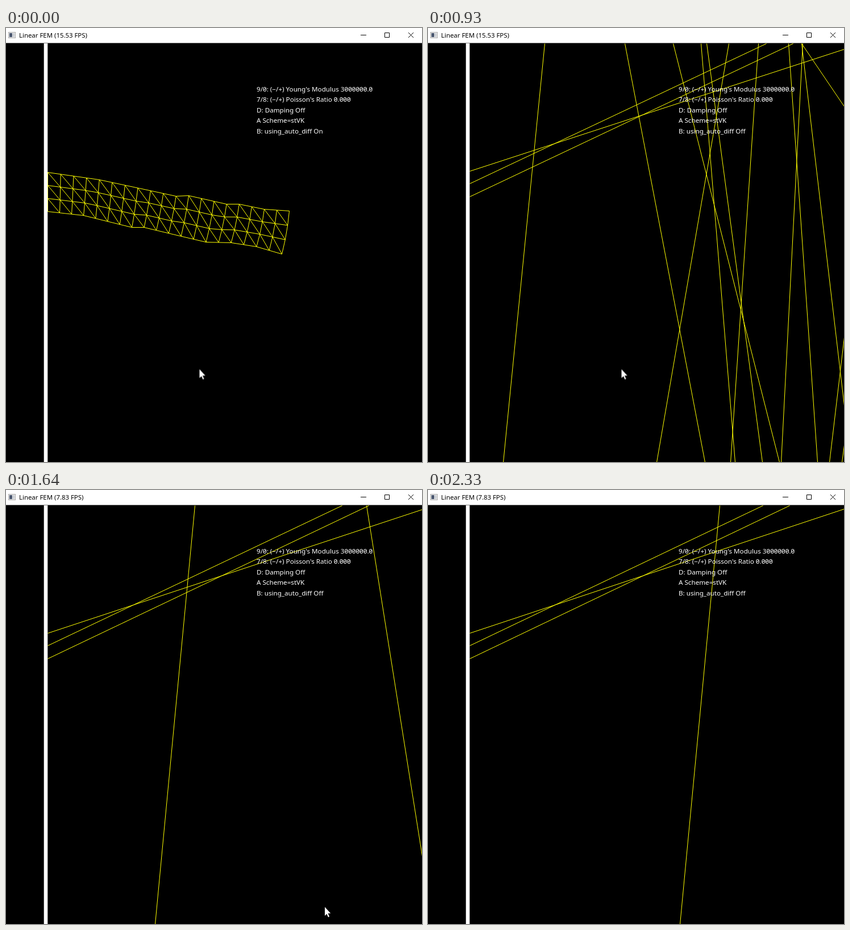
An HTML page that plays this animation: 732 px wide and 765 px high, repeating every 2810 ms.

```html
<!DOCTYPE html>
<html lang="en">
<head>
<meta charset="utf-8">
<title>Linear FEM</title>
<style>
html, body { margin: 0; width: 100%; height: 100%; overflow: hidden; background: #000; }
svg { display: block; width: 100%; height: 100%; }
text { font-family: "Noto Sans", sans-serif; white-space: pre; }
.title { font-size: 11.4px; fill: #000; }
.info { font-size: 11.65px; font-weight: 500; fill: #fff; font-variant-numeric: slashed-zero; }
.wire { fill: none; stroke: #ff0; stroke-width: 1; }
.show { visibility: hidden; animation: 2810ms step-end infinite; }
.cursor { animation: cursor 2810ms step-end infinite; }
#beam, .on { animation-name: first; }
#burst { animation-name: second; }
#spread { animation-name: third; }
#settle0 { animation-name: fourth; }
#settle1 { animation-name: fifth; }
#settle2 { animation-name: sixth; }
.off { animation-name: after-first; }
.fast { animation-name: fast; }
.slow { animation-name: slow; }
@keyframes first { 0% { visibility: visible } 11.387%, 100% { visibility: hidden } }
@keyframes after-first { 0% { visibility: hidden } 11.387%, 100% { visibility: visible } }
@keyframes second { 0% { visibility: hidden } 11.387% { visibility: visible } 33.096%, 100% { visibility: hidden } }
@keyframes third { 0% { visibility: hidden } 33.096% { visibility: visible } 58.362%, 100% { visibility: hidden } }
@keyframes fourth { 0% { visibility: hidden } 58.362% { visibility: visible } 80.427%, 100% { visibility: hidden } }
@keyframes fifth { 0% { visibility: hidden } 80.427% { visibility: visible } 82.918%, 100% { visibility: hidden } }
@keyframes sixth { 0% { visibility: hidden } 82.918%, 100% { visibility: visible } }
@keyframes fast { 0% { visibility: visible } 58.362%, 100% { visibility: hidden } }
@keyframes slow { 0% { visibility: hidden } 58.362%, 100% { visibility: visible } }
@keyframes cursor {
  0% { transform: translate(340.5px, 601.5px) }
  55.516% { transform: translate(342.5px, 602.5px) }
  58.362% { transform: translate(561px, 735px) }
  60.854% { transform: translate(718px, 758px) }
  75.088%, 100% { transform: translate(760px, 800px) }
}
</style>
</head>
<body>
<svg viewBox="0 0 732 765">
  <defs><clipPath id="stage"><rect x="73" y="27" width="659" height="738"/></clipPath></defs>
  <rect width="732" height="765"/>
  <g clip-path="url(#stage)">
    <g class="wire" transform="translate(.5 .5)">
      <path id="beam" class="show"/>
      <path id="burst" class="show"/>
      <path id="spread" class="show"/>
      <path id="settle0" class="show"/>
      <path id="settle1" class="show"/>
      <path id="settle2" class="show"/>
    </g>
  </g>
  <rect x="66.7" y="27" width="6.6" height="738" fill="#fff"/>
  <g class="info">
    <text x="441" y="111.5">9/0: (−/+) Young's Modulus 3000000.0</text>
    <text x="441" y="130">7/8: (−/+) Poisson's Ratio 0.000</text>
    <text x="441" y="148.5">D: Damping Off</text>
    <text x="441" y="167">A Scheme=stVK</text>
    <text x="441" y="185.5" class="show on">B: using_auto_diff On</text>
    <text x="441" y="185.5" class="show off">B: using_auto_diff Off</text>
  </g>
  <rect width="732" height="26.5" fill="#fff"/>
  <rect x="4.5" y="7.5" width="12" height="10" fill="#eee" stroke="#aaa"/>
  <rect x="6" y="9" width="5" height="7" fill="#4b5870"/>
  <rect x="12" y="9" width="3" height="7" fill="#c8ccd2"/>
  <text x="23" y="17" class="title show fast">Linear FEM (15.53 FPS)</text>
  <text x="23" y="17" class="title show slow">Linear FEM (7.83 FPS)</text>
  <path d="M624 12.5h10M666.5 8.5h8v8h-8zM708 8l9 9m0-9l-9 9" fill="none" stroke="#000"/>
  <path class="cursor" d="M0 0V15.5L3.4 12.2 6 18 8 17.1 5.5 11.3H10.2Z" fill="#fff"/>
</svg>
<script>
const TOP = 27, BOTTOM = 765, WALL = 73, RIGHT = 732;

const line = (x1, y1, x2, y2) => `M${x1} ${y1}L${x2} ${y2}`;
const fan = (x, y, ...ends) => ends.map(([a, b]) => line(x, y, a, b)).join("");
const span = (topX, bottomX) => line(topX, TOP, bottomX, BOTTOM);
const repeat = (count, make) => Array.from({ length: count }, (_, i) => make(i)).join("");
const draw = (id, ...parts) => document.getElementById(id).setAttribute("d", parts.join(""));
const mix = (a, b, t) => a + (b - a) * t;

// Three edges that stay pinned to the wall.
const anchors = (edgeY, upperX, lowerX) =>
  line(WALL, 252, RIGHT, edgeY) + line(WALL, 274, upperX, TOP) + line(WALL, 297, lowerX, TOP);

let seed = 11;
const random = () => (seed = seed * 16807 % 2147483647) / 2147483647;

// Steep lines in even steps with some jitter, crossing near one waist.
const bundle = (count, left, right, waistX, waistY) => repeat(count, i => {
  const topX = mix(left, right, (i + random()) / count);
  const midX = waistX + (random() - .5) * (right - left) * .5;
  return span(topX, topX + (midX - topX) * (BOTTOM - TOP) / (waistY - TOP));
});

// Height along a polyline of [column, y] points.
function along(points, c) {
  const i = Math.max(1, points.findIndex(p => p[0] >= c));
  const [c0, y0] = points[i - 1], [c1, y1] = points[i];
  return mix(y0, y1, (c - c0) / (c1 - c0));
}

function beam(columns = 19, rows = 3) {
  const upper = [[0, 254], [4, 267], [10, 296], [11, 295], [14, 310], [15, 310], [17, 319], [19, 322]];
  const lower = [[0, 323], [3, 330], [7, 351], [8, 351], [13, 377], [15, 378], [17, 385], [19, 398]];
  const node = (r, c) => {
    const s = c / columns, t = r / rows;
    const bow = mix(2, -4, t) * Math.sin(Math.PI * s);
    return [mix(WALL, mix(498, 485, t * (t + 1) / 2), s) + bow, mix(along(upper, c), along(lower, c), t)];
  };
  return repeat(rows + 1, r => repeat(columns + 1, c => {
    const ends = [];
    if (c < columns) ends.push(node(r, c + 1));
    if (r < rows) ends.push(node(r + 1, c));
    if (c < columns && r < rows) ends.push(node(r + 1, c + 1));
    return fan(...node(r, c), ...ends);
  }));
}

draw("beam", beam());

draw("burst",
  anchors(48, 613, 657),
  bundle(13, 185, 335, 285, 290),
  bundle(9, 410, 690, 520, 420),
  fan(WALL, 240, [550, TOP], [707, TOP]),
  fan(WALL, 541, [718, TOP], [RIGHT, 195], [WALL, 515]),
  fan(WALL, 70, [103, TOP], [127, TOP]),
  fan(WALL, 518, [136, TOP]),
  fan(WALL, 75, [607, BOTTOM]),
  fan(155, TOP, [RIGHT, 152]),
  span(84, 663), span(101, 268), span(130, 422), span(340, 502),
  fan(469, 291, [RIGHT, 151], [RIGHT, 406], [RIGHT, 602], [111, BOTTOM], [478, TOP], [497, TOP], [408, 484]),
  fan(408, 484, [RIGHT, 208], [497, TOP]),
  repeat(4, i => line(408, 484, 314 + 16 * i, BOTTOM)),
  repeat(3, i => line(626 - 64.5 * i, TOP, RIGHT, 240 + 120 * i)),
  repeat(5, i => line(478 + 40 * i, BOTTOM, RIGHT, 592 + 35 * i)),
  fan(RIGHT, 552, [518, BOTTOM], [577, BOTTOM]));

draw("spread",
  anchors(37, 595, 642),
  span(205, 132), span(346, 487), span(431, 618), span(480, 540), span(490, 588),
  span(529, 402), span(581, 532), span(634, 685), span(659, 621),
  fan(657, TOP, [RIGHT, 138], [RIGHT, 665]),
  line(RIGHT, 545, 706, BOTTOM),
  line(RIGHT, 735, 728, BOTTOM));

// The last loose edges slide right while the pinned ones tilt up.
for (let k = 0; k < 3; k++) {
  const slide = 90.5 * k;
  draw("settle" + k,
    anchors(34 - k / 2, 591 - k, 638 - k),
    span(332 + slide, 262 + slide),
    span(634 + slide, 751 + slide));
}
</script>
</body>
</html>
```
